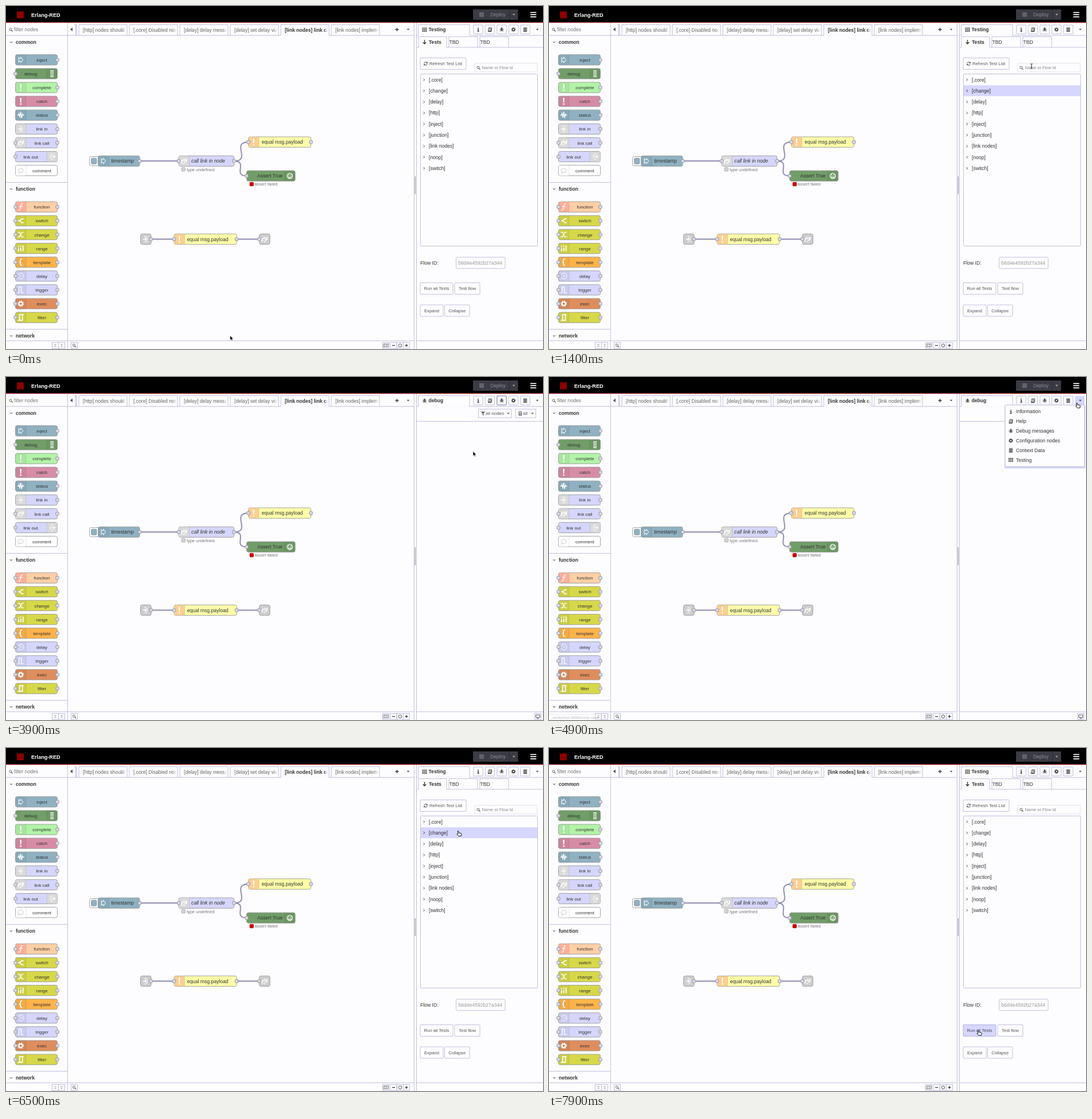
Write an HTML page that moves like this. It is 936 by 598 pixels and loops after 8 s.

```html
<!DOCTYPE html>
<html lang="en">
<head>
<meta charset="utf-8">
<title>Flow editor</title>
<style>
html, body { margin: 0; width: 100%; height: 100%; overflow: hidden; background: #fdfdff }
svg { display: block }
text { font-family: "Liberation Sans", Arial, sans-serif; font-size: 8.6px; fill: #333; white-space: pre }
.i { fill: none; stroke: #fff; stroke-width: 1.3 }
#hot { fill: #d8d8ff; mix-blend-mode: multiply }
</style>
</head>
<body>
<svg id="stage" width="936" height="598" viewBox="0 0 936 598"></svg>
<script>
const BACK = '#fdfdff', LINE = '#b9b9dc', INK = '#333';
const BLUE = '#8fb1c2', GREEN = '#719d68', LINK = '#d6d6fc', LIME = '#d7d849';

const rect = (x, y, w, h, fill = 'none', stroke = 'none', r = 0, more = '') =>
  `<rect x="${x}" y="${y}" width="${w}" height="${h}" rx="${r}" fill="${fill}" stroke="${stroke}" stroke-width=".9" ${more}/>`;
const path = (d, more = '') => `<path d="${d}" fill="none" stroke="${LINE}" stroke-width=".9" ${more}/>`;
const text = (x, y, s, more = '') => `<text x="${x}" y="${y}" ${more}>${s}</text>`;
const size = n => `style="font-size:${n}px"`;
const at = (x, y, s) => `<g transform="translate(${x} ${y})">${s}</g>`;
const MID = 'text-anchor="middle"', BOLD = 'font-weight="bold"';

// White node icons, centred on 0,0
const white = (d, more = '') => `<path class="i" d="${d}" ${more}/>`;
const solid = 'style="fill:#fff;stroke:none"';
const nodeIcons = {
  arrow: white('M-3.5-2.5H0V-5L4 0 0 5V2.5H-3.5M-3.5-5V5', 'style="stroke-width:1"'),
  list: white('M-3-5H3M-3-2.3H3M-3 .4H3M-3 3.1H3M-3 5.4H3'),
  bang: white('M-1.4-6H1.4L.8 2H-.8ZM-1.2 3.6H1.2V6H-1.2Z', solid),
  pulse: white('M-6 0H-4L-3-3-1.5 4 0-6 1.5 5 3-2 4 0H6'),
  linkIn: white('M-2-5A5 5 0 1 1-2 5', 'stroke-dasharray="2.5 1"') + white('M-5 0H0M-1.5-2.5L1 0-1.5 2.5'),
  linkCall: white('M-4 4A4 4 0 0 1-1-2M4-4A4 4 0 0 1 1 2', 'style="stroke-width:2"') + white('M-1-4L2-2-1 0M1 5L-2 3'),
  linkOut: white('M2-5A5 5 0 1 0 2 5', 'stroke-dasharray="2.5 1"') + white('M-1 0H4M2.5-2.5L5 0 2.5 2.5'),
  bubble: `<ellipse rx="4.5" ry="3.5" fill="none" stroke="#ccc"/>` + path('M-3 2.5L-4.5 5-1 3.5', 'style="stroke:#ccc"'),
  func: white('M4-5.5Q.8-7 .3-3L-.8 3Q-1.3 6.8-4 5.3M-2.5-1H3'),
  fork: white('M-5 0H-2L2-3.5H5M-2 0L2 3.5H5', 'style="stroke-width:1.7"'),
  swap: white('M-5-4H-2L2 4H5M-5 4H-2L2-4H5'),
  bars: white('M-4-4V-2M-4 0V5M0-5V-3M0-1V5M4-5V5', 'style="stroke-width:1.8"'),
  brace: white('M2.5-6Q-.5-6-.5-3.5V-1.5Q-.5 0-2.5 0-.5 0-.5 1.5V3.5Q-.5 6 2.5 6', 'style="stroke-width:1.7"'),
  clock: white('M-4-3A5 5 0 1 1-4.5 2M0 0L-3-3M0 0H2', 'style="stroke-width:.9"'),
  edge: white('M-5 5H-3V-5H1V5H5'),
  gear: `<circle class="i" r="3" style="stroke-width:2"/><circle class="i" r="4.6" style="stroke-width:1.8" stroke-dasharray="1.8 1.81"/>`,
  step: white('M-5 5H-2V-5H3V5H-2M3-5H5', 'style="stroke-width:1.6"'),
  smile: `<circle class="i" r="4.6"/>` + white('M-2.6 1Q0 4.5 2.6 1') +
    `<circle cx="-1.7" cy="-1.5" r=".9" fill="#fff"/><circle cx="1.7" cy="-1.5" r=".9" fill="#fff"/>`
};

// Dark interface icons
const dark = (d, w = 1.1, more = '') => path(d, `style="stroke:${INK};stroke-width:${w}" ${more}`);
const ui = {
  info: dark('M-1.2-.8H.3V3M-1.5 3H1.6M-.6-3H.6', 1.3),
  book: dark('M-2-3H3.2L2 2.6H-3L-2-3M-3 2.6V3.6H2.2L3.3-1M-.8-1.4H1.5M-1.2.3H1.2', .9),
  bug: `<ellipse cy=".6" rx="1.6" ry="2.5" fill="${INK}"/><circle cy="-2.4" r="1.2" fill="${INK}"/>` +
    dark('M-3.8.6H3.8M-3.2-2.2L-1.4-.8M3.2-2.2L1.4-.8M-3.1 3.5L-1.4 2M3.1 3.5L1.4 2', .7) +
    path('M0-.6V3', `style="stroke:${BACK};stroke-width:.5"`),
  gear: `<circle r="2.1" fill="none" stroke="${INK}" stroke-width="1.5"/><circle r="3.2" fill="none" stroke="${INK}" stroke-dasharray="1.25 1.26"/>`,
  data: dark('M-3.2-2.7H3.2M-3.2-.7H3.2M-3.2 1.3H3.2M-3.2 3.3H3.2', 1.3),
  grid: dark('M-4-2.6H4M-4 0H4M-4 2.6H4', 1.7, 'stroke-dasharray="2.1 .85"')
};
const caret = (x, y, fill = '#555') => `<path d="M${x - 2.3} ${y - 1.2}h4.6l-2.3 2.6z" fill="${fill}"/>`;
const lens = (x, y) => at(x, y, `<circle cx="-.6" cy="-.6" r="2" fill="none" stroke="#555" stroke-width=".9"/>` + dark('M1 1L3 3'));
const chevron = (x, y, down) => at(x, y, dark(down ? 'M-2-1L0 1.2 2-1' : 'M-1-2L1.2 0-1 2', .9));

const port = (x, y) => rect(x - 2.8, y - 2.8, 5.6, 5.6, '#d9d9e6', '#8f8f9c', 1.6);

// One flow node; `y` is its middle
function node(x, y, w, fill, icon, label, o = {}) {
  const ix = o.right ? x + w - 18.5 : x;
  let s = rect(x, y - 9.1, w, 18.2, fill, '#999', 3);
  s += rect(ix + .4, y - 8.7, 18, 17.4, o.iconFill || 'rgba(0,0,0,.05)', 'none', 2.5);
  if (label) s += path(`M${o.right ? ix : ix + 18.5} ${y - 8.7}v17.4`, 'style="stroke:rgba(0,0,0,.12)"');
  s += at(ix + 9.2, y, nodeIcons[icon]);
  if (label) s += text(o.tx, y + 3, label, `${MID} ${o.more || ''}`);
  if (o.in) s += port(x, y);
  if (o.out) s += port(x + w, y);
  return s;
}

function palette() {
  const grey = { iconFill: '#d9d9d9' };
  const io = { in: 1, out: 1 };
  const groups = [
    [93.9, [
      ['inject', BLUE, 'arrow', { out: 1 }], ['debug', GREEN, 'list', { in: 1, right: 1 }],
      ['complete', '#b2f3a7', 'bang', { out: 1 }], ['catch', '#d78ca6', 'bang', { out: 1 }],
      ['status', BLUE, 'pulse', { out: 1 }], ['link in', LINK, 'linkIn', { out: 1, ...grey }],
      ['link call', LINK, 'linkCall', { ...io, ...grey }], ['link out', LINK, 'linkOut', { in: 1, right: 1, ...grey }],
      ['comment', '#fff', 'bubble', { iconFill: '#fff' }]]],
    [350.3, [
      ['function', '#ffcfa5', 'func', { ...io, iconFill: '#ffad99' }], ['switch', LIME, 'fork', io],
      ['change', LIME, 'swap', io], ['range', LIME, 'bars', io], ['template', '#ffb34a', 'brace', io],
      ['delay', LINK, 'clock', io], ['trigger', LINK, 'edge', io], ['exec', '#de8d5d', 'gear', io],
      ['filter', LIME, 'step', io]]]
  ];
  let s = text(14, 44, 'filter nodes', 'style="fill:#777"') + lens(8.5, 41.3);
  for (const [y0, list] of groups)
    list.forEach(([label, fill, icon, o], i) =>
      s += node(16.5, y0 + i * 24.1, 73, fill, icon, label, { ...o, tx: o.right ? 43 : 62.5, more: size(8) }));
  [['common', 63], ['function', 319], ['network', 575]].forEach(([label, y]) =>
    s += chevron(9, y, true) + text(17, y + 3, label, BOLD));
  s += path('M0 51.3H107M0 307.5H107M0 563.5H107M107.3 29V598');
  s += rect(80.5, 586.5, 11, 10.5, BACK, LINE) + rect(91.5, 586.5, 11, 10.5, BACK, LINE);
  s += dark('M84.5 591L86 589.5 87.5 591M84.5 594L86 592.5 87.5 594', .6);
  return s + dark('M95.5 589.5L97 591 98.5 589.5M95.5 592.5L97 594 98.5 592.5', .6);
}

function header() {
  return rect(0, 0, 936, 29, '#000') + rect(0, 28.2, 936, 1.1, '#c01c1c') +
    rect(19, 9.5, 12, 12, '#8f0000') +
    text(44, 19.2, 'Erlang-RED', `${BOLD} style="fill:#fff;font-size:9.1px"`) +
    rect(814, 6, 78.5, 18, '#3b3b44') + rect(825, 11, 8, 8, '#62626c') +
    text(844, 18, 'Deploy', 'style="fill:#8b8b95"') + path('M877.5 6V24', 'style="stroke:#2a2a30"') +
    caret(885, 15, '#aaa') + path('M914 11.3H924.3M914 15.1H924.3M914 18.9H924.3', 'style="stroke:#fff;stroke-width:1.7"');
}

function tabs() {
  const names = ['[http] nodes should', '[.core] Disabled nodes', '[delay] delay message', '[delay] set delay via', '[link nodes] link call', '[link nodes] implement'];
  let s = path('M107 51.3H711M121.5 32.5V51M119 32.5H123V51');
  names.forEach((name, i) => {
    const x = 127 + i * 88, on = i === 4;
    s += path(`M${x} 51V32.5H${x + 84}V51`);
    if (on) s += rect(x + .5, 50.5, 83, 2, BACK);
    s += `<svg x="${x}" y="33" width="82" height="17">${text(7, 11.5, name, on ? BOLD : 'style="fill:#666"')}${rect(76, 0, 6, 17, 'url(#fade)')}</svg>`;
  });
  return s + '<path d="M116 37.5v6.6l-4.3-3.3z" fill="#556"/>' + dark('M678.5 41H684.5M681.5 38V44', 1.3) + caret(701, 41);
}

function flow() {
  const wire = d => path(d, 'style="stroke:#8c89ad;stroke-width:1.9"');
  // Short wires get a smaller bend
  const bend = (x1, y1, x2, y2) => {
    const k = .75 * Math.min(61.7, Math.hypot(x2 - x1, y2 - y1));
    return wire(`M${x1} ${y1}C${x1 + k} ${y1} ${x2 - k} ${y2} ${x2} ${y2}`);
  };
  const equal = { iconFill: '#ffce91', in: 1, out: 1 };
  const small = 'style="font-size:7.4px;fill:#777"';
  return wire('M233 270.3H301M253 406.5H293M402 406.5H441') +
    bend(397.5, 270.3, 422.5, 237.2) + bend(397.5, 270.3, 419.5, 296.2) +
    rect(145.5, 262.5, 18, 16, '#fff', '#999', 3) + rect(148.5, 265.2, 9.5, 10.4, BLUE, '#999', 2) +
    node(160.5, 270.3, 72.5, BLUE, 'arrow', 'timestamp', { out: 1, tx: 203 }) +
    node(301, 270.3, 96.5, LINK, 'linkCall', 'call link in node', { in: 1, out: 1, iconFill: '#d9d9d9', tx: 352.5, more: 'font-style="italic"' }) +
    node(422.5, 237.2, 109, '#ffffa9', 'bang', 'equal msg.payload', { ...equal, tx: 481.5 }) +
    node(419.5, 296.2, 84.5, GREEN, 'smile', 'Assert True', { in: 1, right: 1, tx: 460 }) +
    rect(306, 281.6, 6.3, 6.3, '#d5d5d5', '#aaa', 1) + text(315, 287.5, 'type undefined', small) +
    rect(425, 307.4, 6.3, 6.3, '#c00', '#b00', 1) + text(433.5, 313.4, 'assert failed', small) +
    node(234.5, 406.5, 18.5, '#d9d9d9', 'linkIn', '') + port(252.5, 406.5) +
    node(293, 406.5, 109, '#ffffa9', 'bang', 'equal msg.payload', { ...equal, tx: 351.5 }) +
    node(441.5, 406.5, 18.5, '#d9d9d9', 'linkCall', '') + port(441.5, 406.5);
}

function frame() {
  let s = path('M0 583.7H711M711.3 29V598M715.5 29V598M715 583.7H936M715 51.3H936');
  s += path('M713.3 297V328', 'style="stroke:#aaa;stroke-width:1.6"');
  s += path('M718.5 51V32.5H808V51') + rect(719, 50.5, 88.5, 2, BACK);
  Object.values(ui).slice(0, 5).forEach((icon, i) => {
    const x = 823 + i * 20.5;
    s += rect(x - 8.2, 33, 16.4, 15.8, BACK, LINE, 1) + at(x, 41, icon);
  });
  s += caret(926, 41);
  s += rect(113.5, 586.5, 11, 10.5, BACK, LINE) + lens(119, 591.8);
  [662, 675.5, 687, 698].forEach(x => s += rect(x - 5.5, 586.5, 11, 10.5, BACK, LINE));
  return s + dark('M658 589.5L660.5 588.7 663.5 589.5 666 588.7V594L663.5 594.8 660.5 594 658 594.8ZM660.5 589V594M663.5 589V594', .6) +
    dark('M673 591.8H678M695.5 591.8H700.5M698 589.3V594.3', 1.2) +
    '<circle cx="687" cy="591.8" r="2.8" fill="none" stroke="#444" stroke-width=".9"/>';
}

const buttons = [
  [722, 90.5, 80, 20], [722, 482.5, 57, 20, 'Run all Tests'], [782, 482.5, 44, 20, 'Test flow'],
  [722, 521, 40, 20, 'Expand'], [764.5, 521, 43.5, 20, 'Collapse']
];
const suites = ['.core', 'change', 'delay', 'http', 'inject', 'junction', 'link nodes', 'noop', 'switch'];
const menuItems = ['Information', 'Help', 'Debug messages', 'Configuration nodes', 'Context Data', 'Testing'];

function testPanel() {
  let s = at(729.5, 41.3, ui.grid) + text(736.5, 44.3, 'Testing', BOLD);
  s += path('M715 72H936M719 72V53.5H768V72M772 72V53.5H822V72M826 72V53.5H876V72') + rect(719.5, 71, 48, 2, BACK);
  s += dark('M729.5 59V66M726.8 63.2L729.5 66 732.2 63.2', 1.3) + text(737, 65.5, 'Tests', BOLD) + text(772.5, 65.5, 'TBD') + text(826.5, 65.5, 'TBD');
  for (const [x, y, w, h, label] of buttons) {
    s += rect(x, y, w, h, BACK, LINE, 1);
    if (label) s += text(x + w / 2, y + 12.8, label, `${MID} style="font-size:7.7px;fill:#555"`);
  }
  s += at(731.5, 100.5, dark('M-2.8-.6A2.9 2.9 0 0 1 2.4-1.6M2.8.6A2.9 2.9 0 0 1-2.4 1.6M2.8-3V-1H.8M-2.8 3V1H-.8', .9));
  s += text(738, 103.3, 'Refresh Test List', 'style="font-size:7.7px;fill:#555"');
  s += rect(817, 100, 109, 15, BACK, '#dedeee') + lens(823.5, 107.8) + text(829.5, 110.4, 'Name or Flow Id', 'style="font-size:7.4px;fill:#888"');
  s += rect(722.5, 118.5, 204, 300, BACK, LINE, 1);
  suites.forEach((name, i) => {
    const y = 128.6 + i * 19.3;
    s += chevron(728.5, y) + text(737, y + 2.9, `[${name}]`);
  });
  return s + text(722, 451, 'Flow ID:') + rect(784.5, 438, 85.5, 19.7, BACK, LINE, 2) +
    text(788.5, 451, 'b6d4e4592b27a344', 'style="fill:#999"');
}

function debugPanel() {
  const label = 'style="fill:#555;font-size:8px"';
  return at(729.5, 41.3, ui.bug) + text(736.5, 44.3, 'debug', BOLD) + path('M715 77.3H936') +
    rect(823.5, 56, 57.5, 15, BACK, LINE) + '<path d="M828 60.5h7l-2.7 3v4l-1.6-1.2v-2.8z" fill="#555"/>' +
    text(836, 66.4, 'all nodes', label) + caret(875.5, 63.7) +
    rect(888, 56, 35.5, 15, BACK, LINE) + dark('M893 61H899.5M894 61.5V67H898.5V61.5M895.5 60H897M895.5 63V66M897 63V66', .8) +
    text(901, 66.4, 'all', label) + caret(917.5, 63.7) +
    rect(921.5, 586.5, 11, 10.5, BACK, LINE) + dark('M923.5 589H930.5V593.5H923.5ZM925 595.3H929', .8);
}

function menu() {
  let s = rect(794, 50, 141, 109.5, '#d3d3f8', 'none', 2) + rect(795, 48.8, 138.5, 107.5, BACK, LINE, 1);
  menuItems.forEach((label, i) => {
    const y = 60.3 + i * 16.87;
    s += at(805, y, Object.values(ui)[i]) + text(814, y + 3, label);
  });
  return s;
}

const group = (id, s) => `<g id="${id}">${s}</g>`;
const cursors =
  group('arrow', '<path d="M0 0V8.2L1.9 6.5 3.2 9.3 4.6 8.7 3.3 6H5.8Z" fill="#000" stroke="#fff" stroke-width=".6"/>') +
  group('hand', '<path d="M-.8.6Q0-.6 .9.6L1.4 3.4 5 4.2Q6.3 4.6 6 6L5.3 9H.9L-2 5.8Q-1.6 4.5 0 5.6Z" fill="#fff" stroke="#000" stroke-width=".9"/>') +
  group('beam', dark('M-2-4.3Q0-4.3 0-3 0-4.3 2-4.3M0-3V3M-2 4.3Q0 4.3 0 3 0 4.3 2 4.3M-1 1H1', 1));

const stage = document.getElementById('stage');
stage.innerHTML =
  `<defs><linearGradient id="fade"><stop stop-color="${BACK}" stop-opacity="0"/><stop offset="1" stop-color="${BACK}"/></linearGradient></defs>` +
  rect(0, 0, 936, 598, BACK) + palette() + tabs() + flow() + frame() + header() +
  group('tests', testPanel()) + group('debug', debugPanel()) +
  group('focus', rect(855.8, 33, 16.4, 15.8, 'none', '#8585a5', 1)) + group('menu', menu()) +
  group('status', rect(-1, 588.5, 91, 10, '#fff', '#bbb', 1) +
    text(88, 595.8, '_renderbox:9090/node-red#', 'text-anchor="end" style="font:6px \'DejaVu Sans\',sans-serif"')) +
  '<rect id="hot"/>' + group('cursor', cursors);

const el = id => document.getElementById(id);
const show = (id, on) => el(id).style.display = on ? '' : 'none';
const clamp = v => Math.max(0, Math.min(1, v));

// Pointer stops: time, x, y
const stops = [
  [0, 390.5, 574.5], [300, 390.5, 574.5], [1300, 834, 148], [1400, 841, 105], [1800, 864, 41], [2200, 864, 41],
  [2700, 814, 129.5], [3900, 814, 129.5], [4700, 920, 45], [5000, 920, 45], [5700, 830, 144.5],
  [6200, 830, 144.5], [6400, 788, 144.5], [6600, 788, 144.5], [7400, 748, 492], [8000, 748, 492]
];
function pointer(t) {
  const i = Math.max(1, stops.findIndex(s => s[0] >= t));
  const [t0, x0, y0] = stops[i - 1], [t1, x1, y1] = stops[i];
  const p = clamp((t - t0) / (t1 - t0)), e = p * p * (3 - 2 * p);
  return [x0 + (x1 - x0) * e, y0 + (y1 - y0) * e];
}

const inside = ([x, y], [l, t, w, h]) => x >= l && x <= l + w && y >= t && y <= t + h;
const iconHits = [0, 1, 2, 3, 4, 5].map(i => [i < 5 ? 814.8 + i * 20.5 : 917, 33, 16.4, 15.8]);
const rowHits = suites.map((_, i) => [723, 119 + i * 19.3, 203.2, 18.9]);
const menuHits = menuItems.map((_, i) => [795.5, 52 + i * 16.87, 137.8, 16.8]);

function draw(now) {
  const t = Math.floor(now % 8000 / 100) * 100;
  const testing = t < 2000 || t >= 6200, open = t >= 4800 && t < 6200;
  const hits = [...iconHits, ...(testing ? [...rowHits, ...buttons] : []), ...(open ? menuHits : [])];
  const find = p => hits.find(h => inside(p, h));
  show('tests', testing);
  show('debug', !testing);
  show('focus', t >= 2000 && t < 4800);
  show('menu', open);
  el('status').style.opacity = clamp((t - 1900) / 300) * clamp((3000 - t) / 300) +
    clamp((t - 4800) / 300) * clamp((6400 - t) / 300);

  // The highlight trails the pointer slightly
  const hot = find(pointer(Math.max(0, t - 100)));
  show('hot', hot);
  if (hot) ['x', 'y', 'width', 'height'].forEach((k, i) => el('hot').setAttribute(k, hot[i]));

  const p = pointer(t);
  const shape = testing && inside(p, [817, 99, 109, 17]) ? 'beam' : find(p) ? 'hand' : 'arrow';
  ['arrow', 'hand', 'beam'].forEach(id => show(id, id === shape));
  el('cursor').setAttribute('transform', `translate(${p})`);
}

const start = performance.now();
(function tick() {
  draw(performance.now() - start);
  requestAnimationFrame(tick);
})();
</script>
</body>
</html>
```
